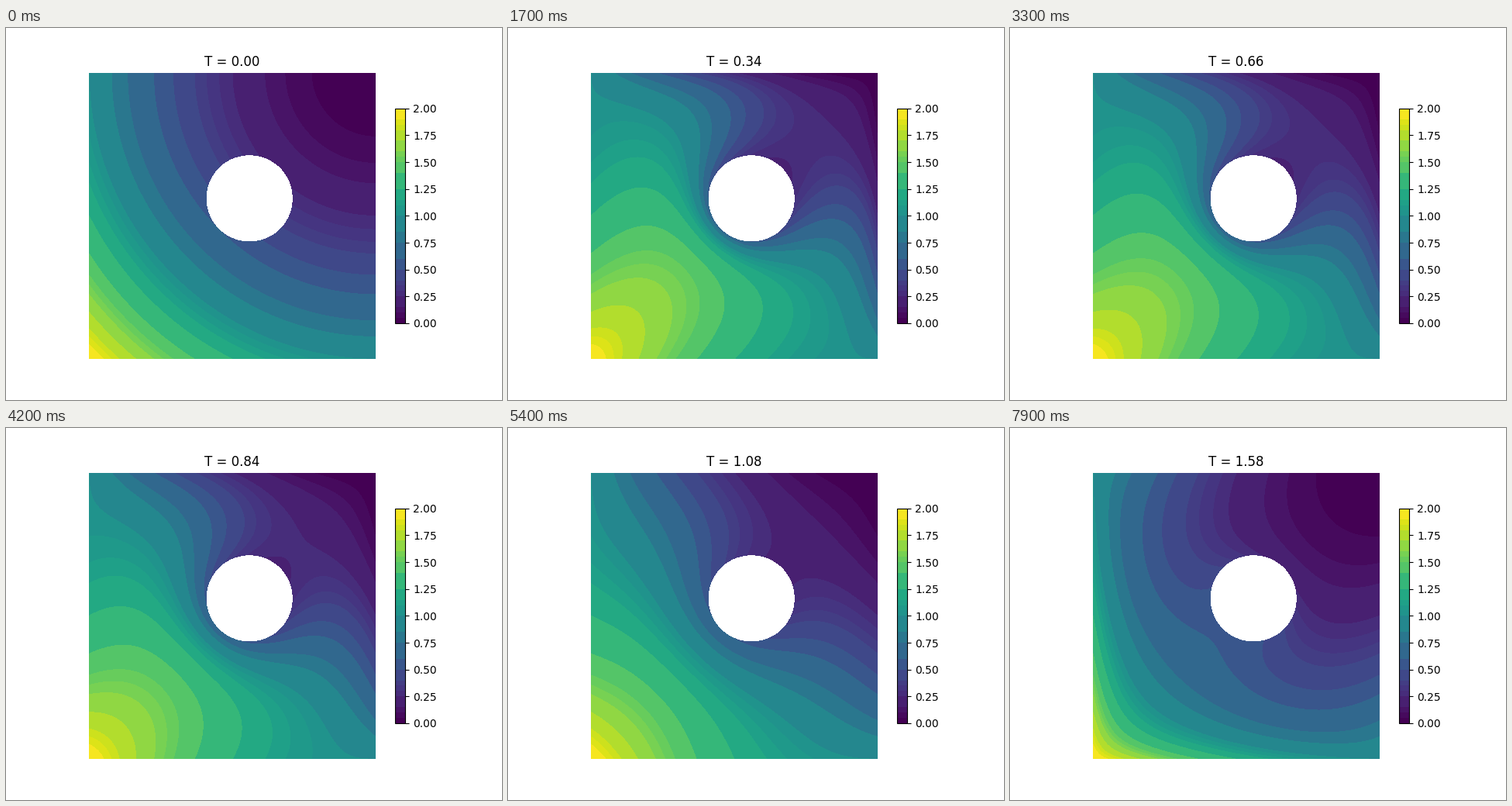
These frames come from a looping animation (640 px wide and 480 px high, 8 s). A matplotlib script:

```python
import numpy as np
import matplotlib.pyplot as plt
from matplotlib.animation import FuncAnimation
from matplotlib.patches import Circle

FRAMES, FRAME_DT = 80, 0.02
N, SUBSTEPS = 140, 180
DIFFUSION = 0.1
CENTER, RADIUS = (0.56, 0.561), 0.149

axis = np.linspace(0, 1, N + 1)
x, y = np.meshgrid(axis, axis)
start = (1 - x) ** 2 + (1 - y) ** 2
outside = np.hypot(x - CENTER[0], y - CENTER[1]) > RADIUS
free = outside[1:-1, 1:-1].astype(float)


def speed(t):
    """Diagonal wind, equal in x and y, that slowly reverses."""
    return np.cos(np.pi * t / 2)


def simulate():
    """Advection-diffusion with fixed values on the walls and the hole."""
    u = start.copy()
    inner = u[1:-1, 1:-1]
    west, east = u[1:-1, :-2], u[1:-1, 2:]
    south, north = u[:-2, 1:-1], u[2:, 1:-1]
    dt = FRAME_DT / SUBSTEPS
    spread = DIFFUSION * dt * N ** 2
    states = [u.copy()]
    for step in range((FRAMES - 1) * SUBSTEPS):
        drift = speed(step * dt) * dt * N / 2
        change = (spread + drift) * (west + south)
        change += (spread - drift) * (east + north)
        change -= 4 * spread * inner
        change *= free
        inner += change
        if (step + 1) % SUBSTEPS == 0:
            states.append(u.copy())
    return states


def band_colors():
    """One colour per level step; neighbouring steps share a tone."""
    cuts = [0, 1, 2, 3, 5, 6, 7, 8, 10, 12, 15, 17, 20, 21, 22, 23, 25,
            28, 30, 31, 32, 34, 36, 37, 38, 40]
    colors = []
    for lo, hi in zip(cuts, cuts[1:]):
        tone = plt.cm.viridis((lo + hi - 1) / 2 / 39)
        colors += [tone] * (hi - lo)
    return colors


levels = np.linspace(0, 2, 41)
colors = band_colors()
states = simulate()

fig, ax = plt.subplots(figsize=(6.4, 4.8), dpi=100)
ax.set_aspect("equal")
ax.set_axis_off()


def draw_field(u):
    return ax.contourf(x, y, u, levels=levels, colors=colors)


field = draw_field(states[0])
fig.colorbar(field, ax=ax, shrink=0.75)
ax.set(xlim=(0, 1), ylim=(0, 1))
ax.add_patch(Circle(CENTER, RADIUS, fc="white", ec="none", lw=0,
                    antialiased=False, zorder=3))
title = ax.set_title("T = 0.00")


def update(i):
    global field
    field.remove()
    field = draw_field(states[i])
    title.set_text(f"T = {i * FRAME_DT:.2f}")
    return field, title


anim = FuncAnimation(fig, update, frames=FRAMES, interval=100,
                     init_func=lambda: (), repeat=True, repeat_delay=0)
plt.show()
```
